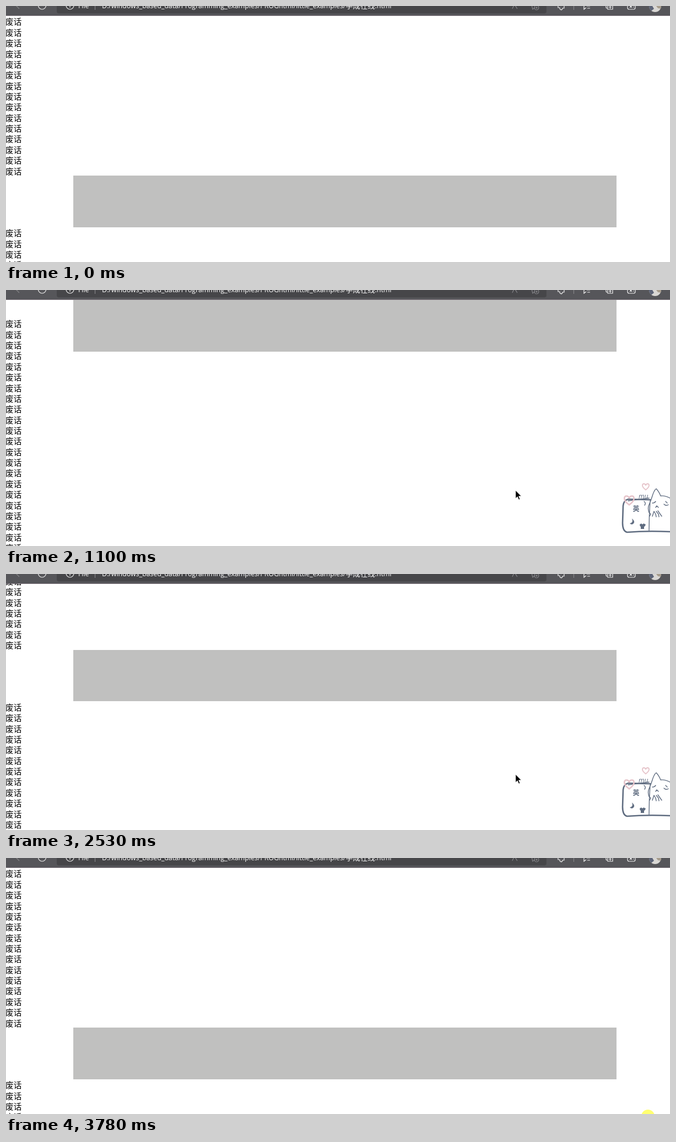
Animation, 1204 px wide and 465 px high, one loop 3850 ms. Source, as an HTML page:

```html
<!DOCTYPE html>
<html lang="zh">
<head>
<meta charset="utf-8">
<style>
  html, body { margin: 0; width: 100%; height: 100%; overflow: hidden; background: #fff; }
  svg { display: block; }
  #rows { font: 14.7px "Noto Sans CJK SC", "Noto Sans CJK", sans-serif; }
  #bar text { font: 12.35px "Open Sans", "Noto Sans CJK SC", sans-serif; fill: #fff; }
  #bar .cjk { font-size: 13.3px; }
  .icon { fill: none; stroke: #f2f2f2; stroke-width: 1.2; }
  .dim { stroke: #858589; }
  .ink { fill: none; stroke: #5f6c80; stroke-width: 1.4; stroke-linecap: round; stroke-linejoin: round; }
  .heart { fill: none; stroke: #e6c4ca; stroke-width: 1.8; }
  #pet text { fill: #5f6c80; }
</style>
</head>
<body>
<svg width="1204" height="465" viewBox="0 0 1204 465">
  <defs>
    <path id="heart" d="M0 5C-4 2-6-1-6-3C-6-7-1-7 0-3C1-7 6-7 6-3C6-1 4 2 0 5Z"/>
    <clipPath id="face"><circle cx="1177" cy="0" r="11"/></clipPath>
  </defs>

  <g id="rows"></g>
  <rect id="band" x="122" width="985" fill="#c0c0bf"/>

  <g id="bar">
    <rect width="1204" height="18" fill="#56565a"/>
    <rect y="17" width="1204" height="1" fill="#766d76"/>
    <rect x="92" y="-10" width="888" height="23.5" rx="4" fill="#464649"/>
    <path class="icon dim" d="M18-1L24 5"/>
    <circle class="icon" cx="65.500" cy="-1" r="7"/>
    <circle class="icon" cx="116" cy="-1" r="7"/>
    <path class="icon" d="M116-2V3"/>
    <text x="131" y="4">File</text>
    <path class="icon dim" d="M161.500 0V7"/>
    <text x="174" y="4">D:/windows_based_data/Programming_examples/PROGhtml/little_examples/<tspan class="cjk">学成在线</tspan>.html</text>
    <path class="icon dim" d="M918 5L922-3L927 5M953-2L955 6L959 3"/>
    <circle class="icon dim" cx="962" cy="3" r="4"/>
    <path class="icon dim" d="M960 3H964M962 1V5M1029.500 0V7"/>
    <path class="icon" d="M1001-2V3H1004C1004 8 1009 8 1009 4H1012V0M1048-2V6L1052 3M1053 0H1059M1054 4H1059"/>
    <path class="icon" d="M1088-2V2Q1088 4 1090 4M1091-2H1100V6H1091ZM1093 2H1098M1095.500-1V5"/>
    <path class="icon" d="M1127-2V3Q1127 6 1130 6H1138Q1141 6 1141 3V-2M1131-1L1135 3M1135-1L1131 3M1137 2H1139"/>
    <g clip-path="url(#face)">
      <rect x="1166" width="22" height="12" fill="#d9d7d4"/>
      <path d="M1166 0H1172L1175 5L1170 9H1166Z" fill="#5d6478"/>
      <path d="M1179 0H1188V5L1182 4Z" fill="#a79c8c"/>
    </g>
  </g>

  <g id="pet">
    <path d="M1122 381H1168L1179 361L1188 374L1204 378V439H1122Z" fill="#fff"/>
    <path class="ink" stroke-width="3" style="stroke-width:2.6" d="M1168 381L1128 380Q1120 382 1119 392L1118 423Q1118 438 1126 440Q1162 437 1204 439"/>
    <path class="ink" d="M1128 383L1166 378M1168 383Q1166 410 1166 437M1166 404Q1163 396 1166 390Q1170 381 1172 374Q1175 364 1179 361Q1184 366 1187 374Q1195 373 1204 378"/>
    <path class="ink" d="M1157 384Q1161 387 1158 391M1166 404L1169 407L1167 411M1172 387Q1176 387 1178 384M1193 389Q1197 393 1201 390M1178 395L1180 392L1183 395M1196 384L1199 387"/>
    <path class="ink" d="M1172 411L1175 402L1178 407L1179 412M1179 402L1183 407L1184 412M1182 401L1189 411"/>
    <text x="1147" y="379" font-family="'Open Sans', sans-serif" font-size="12" font-style="italic">mu</text>
    <text x="1136.500" y="402" font-family="'Noto Sans CJK SC', sans-serif" font-size="12" font-weight="700">英</text>
    <path d="M1135 415Q1142 421 1137 425Q1134 427 1131 424Q1138 423 1135 415Z" fill="#5f6c80"/>
    <path d="M1149 426L1152 424Q1154 427 1156 424L1160 426L1158 430L1157 429V434H1151V429L1150 430Z" fill="#5f6c80"/>
    <use class="heart" href="#heart" x="1160" y="358"/>
    <use class="heart" href="#heart" transform="translate(1130 383) scale(1.45)"/>
  </g>

  <circle id="click" cx="1164" cy="469" r="12" fill="#ffff70"/>
  <path id="cursor" d="M0 0V14.500L3.400 11.400L5.800 17L8 16L5.700 10.600H10.300Z" stroke="#fff" stroke-width=".7"/>
</svg>
<script>
const $ = id => document.getElementById(id);
const LOOP = 3850, FRAME = 68.75, SLACK = 15;
const TOP = 18, PITCH = 19.36, BEFORE = 15, AFTER = 30, BAND_H = 93.5;
const bandY = TOP + BEFORE * PITCH;

// Keys: frame index, then values
const scrollKeys = [
  [8, 0], [9, 20], [10, 65], [11, 116], [12, 171.5], [15, 321], [16, 351], [17, 364], [18, 364], [19, 369.8],
  [20, 369.8], [21, 386], [23, 449], [24, 462.3], [28, 462.3], [29, 445], [31, 378], [32, 368],
  [33, 368], [34, 347], [35, 297], [37, 170.4], [39, 55], [40, 17], [41, 0.7], [42, 0]
];
const cursorKeys = [
  [0, 1164, 482], [1, 1146, 464], [3, 1068, 430], [6, 946, 374], [8, 924, 364],
  [43, 924, 364], [44, 964, 385], [51, 1120, 452], [52, 1140, 468], [53, 1164, 485]
];

function sample(keys, f) {
  const next = keys.findIndex(k => k[0] > f);
  if (next < 0) return keys[keys.length - 1].slice(1);
  if (next === 0) return keys[0].slice(1);
  const a = keys[next - 1], b = keys[next], u = (f - a[0]) / (b[0] - a[0]);
  return a.slice(1).map((v, i) => v + (b[i + 1] - v) * u);
}

for (let i = 0; i < BEFORE + AFTER; i++) {
  const row = document.createElementNS("http://www.w3.org/2000/svg", "text");
  const gap = i < BEFORE ? 0 : BAND_H;
  row.setAttribute("x", -1);
  row.setAttribute("y", TOP + PITCH * (i + 0.5) + gap + 6.8);
  row.textContent = "废话";
  $("rows").append(row);
}

const show = (id, on) => $(id).setAttribute("visibility", on ? "visible" : "hidden");

function draw(now) {
  const f = Math.min(55, Math.floor((now % LOOP + SLACK) / FRAME));
  const [scroll] = sample(scrollKeys, f);
  const y = Math.max(TOP, bandY - scroll); // sticky at the page top
  $("rows").setAttribute("transform", `translate(0 ${-scroll})`);
  $("band").setAttribute("y", Math.round(y));
  $("band").setAttribute("height", Math.round(y + BAND_H) - Math.round(y));
  $("cursor").setAttribute("transform", `translate(${sample(cursorKeys, f)})`);
  show("pet", f > 0 && f < 53);
  show("click", f === 55);
  requestAnimationFrame(draw);
}
requestAnimationFrame(draw);
</script>
</body>
</html>
```
